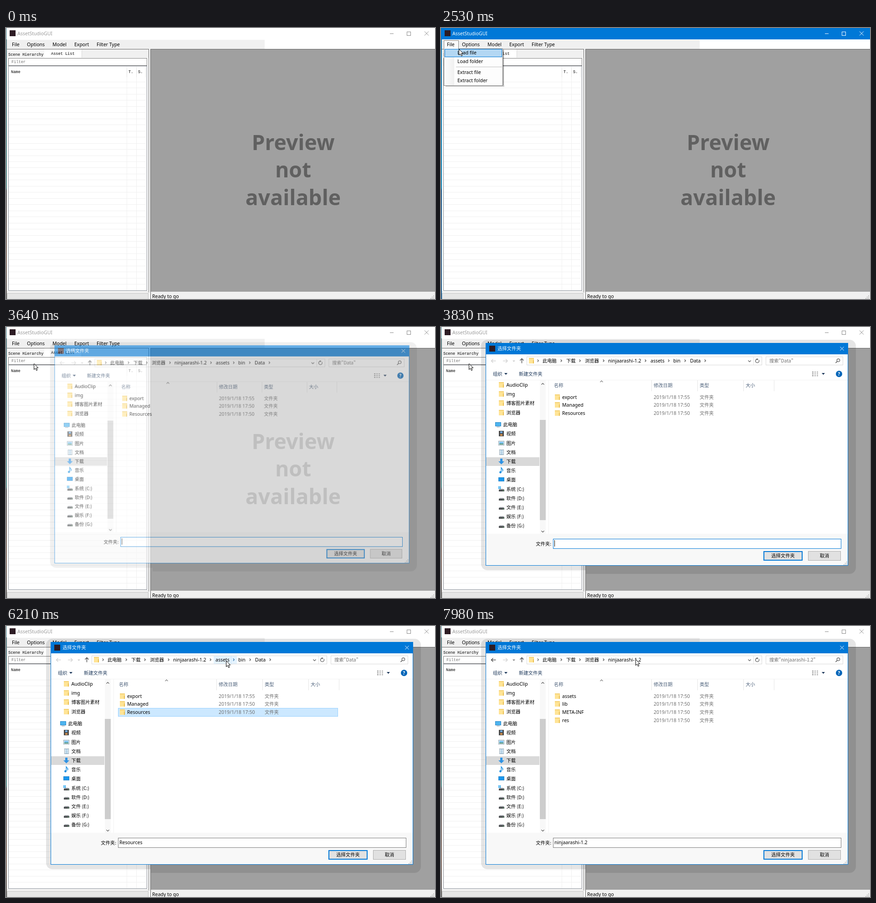
An HTML page with a canvas that plays this animation: 942 px wide and 595 px high, repeating every 8 s.

```html
<!DOCTYPE html>
<html lang="zh">
<head>
<meta charset="utf-8">
<title>AssetStudioGUI</title>
<style>
html, body { margin: 0; width: 942px; height: 595px; overflow: hidden; background: #fff; }
canvas { display: block; }
</style>
</head>
<body>
<canvas id="stage" width="942" height="595"></canvas>
<script>
const g = document.getElementById('stage').getContext('2d');
const LOOP = 8000, STEP = 79;
const UI = '"Noto Sans", "Noto Sans CJK SC", "Noto Sans CJK", sans-serif';
const CJK = '"Noto Sans CJK SC", "Noto Sans CJK", sans-serif';
const MONO = '"Liberation Mono", monospace';
const BLUE = '#0078d7', LOGO = '#2d1c24';

// Pointer moves: [time, x, y]; the pointer rests between groups.
const moves = [
  [[300, 932, 433], [540, 560, 262], [780, 190, 104], [950, 50, 46], [1090, 22, 34]],
  [[2530, 39, 46], [2610, 44, 55], [2780, 61, 80]],
  [[4050, 61, 80], [4250, 160, 108], [4500, 290, 152], [4670, 327, 165], [4840, 330, 171]],
  [[4930, 330, 176], [5010, 330, 184]],
  [[5180, 330, 184], [5340, 332, 184], [5700, 425, 128], [5970, 480, 86]],
  [[6070, 483, 76], [6400, 483, 76], [6870, 485, 73]],
  [[6940, 478, 73], [7430, 427, 73]]
];

const crumbs = [['此电脑', 223, 264], ['下载', 275, 305], ['浏览器', 316, 357],
  ['ninjaarashi-1.2', 367, 449], ['assets', 460, 500], ['bin', 510, 536], ['Data', 547, 580]];

const places = {
  Data: { depth: 7, rows: ['export', 'Managed', 'Resources'] },
  assets: { depth: 5, rows: ['bin'] },
  'ninjaarashi-1.2': { depth: 4, rows: ['assets', 'lib', 'META-INF', 'res'] }
};

const nav = ['AudioClip', 'img', '博客图片素材', '浏览器', '此电脑', '视频', '图片', '文档', '下载',
  '音乐', '桌面', '系统 (C:)', '软件 (D:)', '文件 (E:)', '娱乐 (F:)', '备份 (G:)'];

function box(x, y, w, h, fill, stroke) {
  if (fill) { g.fillStyle = fill; g.fillRect(x, y, w, h); }
  if (stroke) {
    g.strokeStyle = stroke; g.lineWidth = 1;
    g.strokeRect(x + .5, y + .5, w - 1, h - 1);
  }
}

function line(color, width, ...pts) {
  g.strokeStyle = color; g.lineWidth = width;
  g.beginPath();
  for (let i = 0; i < pts.length; i += 2) g.lineTo(pts[i], pts[i + 1]);
  g.stroke();
}

function poly(color, ...pts) {
  g.fillStyle = color;
  g.beginPath();
  for (let i = 0; i < pts.length; i += 2) g.lineTo(pts[i], pts[i + 1]);
  g.fill();
}

function disc(x, y, r, color) {
  g.fillStyle = color;
  g.beginPath(); g.arc(x, y, r, 0, 7); g.fill();
}

function text(s, x, cy, color = '#000', align = 'left') {
  const han = /[\u4e00-\u9fff]/.test(s);
  g.font = han ? '10.3px ' + CJK : '10.5px ' + UI;
  g.fillStyle = color; g.textAlign = align;
  g.fillText(s, x, cy + 4);
}

function mono(s, x, base, color = '#000') {
  g.font = '8.6px ' + MONO;
  g.fillStyle = color; g.textAlign = 'left';
  g.fillText(s, x, base);
}

function cross(x, y, r, color) {
  line(color, 1, x - r, y - r, x + r, y + r);
  line(color, 1, x + r, y - r, x - r, y + r);
}

// dir: 0 right, 1 down, 2 left, 3 up
function chevron(x, y, dir, r, color) {
  g.save();
  g.translate(x, y); g.rotate(dir * Math.PI / 2);
  line(color, 1.1, -r / 2, -r, r / 2, 0, -r / 2, r);
  g.restore();
}

function arrow(x, y, dir, color) {
  g.save();
  g.translate(x, y); g.rotate(dir * Math.PI / 2);
  line(color, 1.3, -5, 0, 5, 0);
  line(color, 1.3, 1, -4, 5, 0, 1, 4);
  g.restore();
}

function grip(x, y) {
  for (let i = 0; i < 3; i++)
    for (let j = 2 - i; j < 3; j++) box(x + j * 3, y + i * 3, 1.5, 1.5, '#a0a0a0');
}

function pointerAt(t) {
  if (t < moves[0][0][0]) return null;
  const path = moves.filter(m => m[0][0] <= t).pop();
  const start = path[0][0], end = path[path.length - 1];
  if (t >= end[0]) return { x: end[1], y: end[2] };
  const q = start + Math.floor((t - start) / STEP) * STEP;
  const i = path.findIndex(k => k[0] > q);
  const [a, b] = [path[i - 1], path[i]];
  const f = (q - a[0]) / (b[0] - a[0]);
  return { x: Math.round(a[1] + (b[1] - a[1]) * f), y: Math.round(a[2] + (b[2] - a[2]) * f) };
}

function drawPointer({ x, y }) {
  g.save();
  g.translate(x + .5, y + .5);
  g.lineJoin = 'miter';
  g.beginPath();
  for (const [px, py] of [[0, 0], [0, 13], [3, 10.2], [5.2, 15], [7.4, 14], [5.2, 9.4], [9.3, 9.2]]) g.lineTo(px, py);
  g.closePath();
  g.fillStyle = '#fff'; g.fill();
  g.strokeStyle = '#000'; g.lineWidth = 1; g.stroke();
  g.restore();
}

function drawBusy({ x, y }) {
  g.beginPath(); g.arc(x, y, 7.5, 0, 7);
  g.strokeStyle = '#2f9be0'; g.lineWidth = 3.5; g.stroke();
}

function drawWindow(t, p) {
  const active = t >= 1330 && t < 3340, menu = t >= 2050 && t < 3260;
  box(0, 0, 942, 595, '#fff');
  // title bar
  if (active) box(0, 0, 942, 25, BLUE);
  const ink = active ? '#fff' : '#999';
  box(8, 5, 13, 13, LOGO);
  text('AssetStudioGUI', 25, 12, ink);
  const btn = active ? '#fff' : '#8a8a8a';
  line(btn, 1, 843, 12.5, 851, 12.5);
  box(880, 8, 9, 9, null, btn);
  cross(923.5, 12, 4.5, btn);

  // menu bar
  box(2, 26, 566, 20, '#f0f0f0');
  if (menu) box(6, 27, 33, 20, '#fafafa', '#808080');
  else if (p && t < 2050 && p.x < 39 && p.y < 45) box(6, 27, 33, 18, '#b3d7f3', BLUE);
  [['File', 13], ['Options', 46], ['Model', 102], ['Export', 150], ['Filter Type', 199]]
    .forEach(([s, x]) => text(s, x, 36));

  // left panel
  box(2, 46, 312, 549, '#fff');
  box(2, 47, 311, 18, '#f0f0f0');
  box(2, 48, 82, 17, '#f5f5f5');
  box(84, 47, 82, 19, '#fff');
  box(166, 47, 1, 18, '#d9d9d9');
  box(1, 46, 313, 1, '#6a6a6a');
  box(313, 46, 1, 535, '#6a6a6a');
  box(314, 47, 3, 548, '#f4f4f4');
  mono('Scene Hierarchy', 5, 61);
  mono('Asset List', 99, 59);
  box(5, 66, 305, 17, '#fff', '#7a7a7a');
  mono('Filter', 12, 77, '#6d6d6d');
  box(5, 83, 305, 494, '#fff', '#828790');
  for (let i = 0; i < 34; i++) box(6, Math.round(118 + i * 13.46), 301, 1, '#f0f0f0');
  [265, 286, 306].forEach(x => {
    box(x, 108, 1, 468, '#f0f0f0');
    box(x, 85, 1, 23, '#e2e2e2');
  });
  mono('Name', 11, 99);
  mono('T.', 269, 99);
  mono('S.', 290, 99);
  box(2, 579, 312, 1, '#d0d0d0');
  box(2, 582, 311, 14, '#e6e6e6', '#bcbcbc');

  // preview
  box(317, 46, 625, 533, '#a0a0a0');
  box(317, 46, 625, 1, '#646464');
  box(317, 46, 1, 549, '#646464');
  g.font = 'bold 46.3px "Open Sans", "Noto Sans", sans-serif';
  g.fillStyle = '#606060'; g.textAlign = 'center';
  ['Preview', 'not', 'available'].forEach((s, i) => g.fillText(s, 630.5, 267.5 + i * 60.7));
  box(318, 579, 624, 16, '#f0f0f0');
  text('Ready to go', 321, 589);
  grip(932, 587);

  // desktop showing at the left edge
  const edge = g.createLinearGradient(0, 0, 0, 595);
  [[0, '#3f7f8c'], [.25, '#2a8a94'], [.59, '#2a9a98'], [.6, '#3a3a40'], [.86, '#8a5a44'], [1, '#444']]
    .forEach(s => edge.addColorStop(...s));
  box(0, active ? 25 : 0, 1, 595, edge);
  box(1, 25, 1, 570, active ? BLUE : '#8c8c8c');

  if (menu) drawMenu(t, p);
}

function drawMenu(t, p) {
  box(10, 126, 129, 3, 'rgba(0,0,0,.2)');
  box(136, 48, 2, 78, 'rgba(0,0,0,.35)');
  box(6, 45, 130, 82, '#fdfdfd', '#808080');
  box(7, 44, 31, 2, '#fafafa');
  const shade = g.createLinearGradient(7, 0, 29, 0);
  shade.addColorStop(0, '#fcfcfc'); shade.addColorStop(1, '#f0f0f0');
  box(7, 46, 22, 80, shade);
  if (t >= 2530) box(8, p.y < 64 ? 46 : 64, 126, 18, '#b3d7f3', BLUE);
  box(33, 85, 101, 1, '#bdbdbd');
  [['Load file', 54], ['Load folder', 73], ['Extract file', 97], ['Extract folder', 115]]
    .forEach(([s, y]) => text(s, 36, y));
}

function folder(x, cy) {
  box(x, cy - 6, 11, 12, '#f4d06f');
  box(x, cy - 4, 10, 10, '#ffe496');
  box(x + 9, cy - 1, 2, 7, '#e9bd4e');
}

function navIcon(i, x, y) {
  if (i < 4) return folder(x + 1, y);
  if (i === 4 || i === 10) {
    box(x, y - 5, 13, 9, i === 4 ? '#4db4ee' : '#1a97ee', '#2b87c8');
    if (i === 4) box(x + 3, y + 5, 7, 1, '#7a8a96');
  } else if (i === 5) {
    box(x + 1, y - 6, 11, 12, '#4a4a4a');
    box(x + 4, y - 5, 5, 4, '#6fa8dc');
    box(x + 4, y + 1, 5, 4, '#c98c4e');
  } else if (i === 6) {
    box(x, y - 5, 13, 10, '#f2f7fa', '#8aa0b0');
    box(x + 2, y - 3, 9, 4, '#7cc1ee');
    box(x + 2, y + 1, 9, 2, '#4d8f72');
  } else if (i === 7) {
    box(x + 2, y - 6, 10, 12, '#fff', '#8aa0b0');
    for (let k = 0; k < 4; k++) box(x + 4, y - 4 + k * 2.5, 6, 1, '#5b9bc8');
  } else if (i === 8) {
    poly('#2f93e4', x + 4, y - 6, x + 9, y - 6, x + 9, y, x + 13, y, x + 6.5, y + 6.5, x, y, x + 4, y);
  } else if (i === 9) {
    disc(x + 4.5, y + 4, 2.4, '#1a8fe0');
    line('#1a8fe0', 1.5, x + 6.3, y + 4, x + 6.3, y - 6, x + 10, y - 1, x + 9, y + 2);
  } else {
    poly('#b8bcc0', x + 3, y - 1, x + 11, y - 1, x + 13, y + 2, x + 1, y + 2);
    box(x + 1, y + 1, 12, 4, '#4c4f52');
    box(x + 10, y + 3, 2, 1, '#7fe08c');
    if (i === 11) for (let k = 0; k < 4; k++) box(x + (k & 1) * 3, y - 6 + (k >> 1) * 3, 2.3, 2.3, '#1a9fee');
  }
}

function drawShadow() {
  g.fillStyle = 'rgba(0,0,0,.1)';
  g.beginPath();
  g.roundRect(88, 28, 814, 506, 14);
  g.roundRect(318, 28, 593, 514, [0, 14, 14, 0]);
  g.fill();
}

function drawAddress(t, p, name) {
  const depth = places[name].depth, last = name === 'ninjaarashi-1.2';
  arrow(115.5, 74.5, 2, name === 'Data' ? '#cfcfcf' : '#444');
  arrow(141, 74.5, 0, '#cfcfcf');
  chevron(160, 74.5, 1, 2, name === 'Data' ? '#bbb' : '#555');
  arrow(177.5, 74.5, 3, '#444');
  box(188, 65, 517, 19, '#fff', '#d9d9d9');
  box(686, 66, 1, 17, '#e2e2e2');
  folder(193, 74);
  chevron(213, 74, 0, 2.5, '#555');
  const pressed = t >= 6370 && t < 6450 || t >= 7590 && t < 7730;
  for (let i = 0; i < depth; i++) {
    const [s, x, cx] = crumbs[i];
    const left = x - 3.5 | 0, right = cx + 7;
    const over = p.y >= 66 && p.y < 83 && p.x >= left && p.x < right && t >= 6070 && t < 7730;
    if (over) {
      box(left, 66, right - left, 17, pressed ? '#cce8ff' : '#e5f3ff');
      box(cx - 6, 66, 1, 17, '#cce8ff');
    }
    text(s, x, 74);
    if (!(last && i === depth - 1)) chevron(cx, 74, 0, 2.5, over ? '#2a6fa8' : '#444');
  }
  chevron(677.5, 75, 1, 3, '#555');
  g.beginPath(); g.arc(694.5, 74.5, 4, -.6, 4.6);
  g.strokeStyle = '#555'; g.lineWidth = 1.2; g.stroke();
  poly('#555', 693, 69, 697, 70.5, 693.5, 73);
  box(713, 65, 170, 19, '#fff', '#d9d9d9');
  text('搜索"' + name + '"', 721, 74, '#6d6d6d');
  g.beginPath(); g.arc(872.5, 73, 3.2, 0, 7);
  g.strokeStyle = '#555'; g.lineWidth = 1.2; g.stroke();
  line('#555', 1.6, 870, 75.5, 866.5, 79);
}

function drawDialog(t, p) {
  const name = t < 6450 ? 'Data' : t < 7730 ? 'assets' : 'ninjaarashi-1.2';
  const picked = t >= 5180;
  drawShadow();
  box(98, 35, 796, 489, '#fff');
  box(98, 35, 796, 25, BLUE);
  box(106, 41, 13, 13, LOGO);
  text('选择文件夹', 124, 47, '#fff');
  cross(880.5, 47.5, 4, '#fff');
  drawAddress(t, p, name);

  // tool bar
  text('组织', 114, 103, '#1e395b');
  poly('#1e395b', 139, 101, 146, 101, 142.5, 105);
  text('新建文件夹', 171, 103, '#1e395b');
  for (let i = 0; i < 3; i++) {
    box(815, 98 + i * 4, 3, 2, '#8a8a8a');
    box(820, 98 + i * 4, 3, 2, '#a5a5a5');
    box(825, 98 + i * 4, 3, 2, '#a5a5a5');
  }
  poly('#1e395b', 836, 101, 843, 101, 839.5, 105);
  disc(874, 103, 7, '#0065b8');
  g.font = 'bold 10px ' + UI; g.fillStyle = '#fff'; g.textAlign = 'center';
  g.fillText('?', 874, 106.6);
  box(99, 116, 794, 1, '#f2f2f2');

  // navigation pane
  box(99, 286, 117, 19, '#d9d9d9');
  nav.forEach((s, i) => {
    const y = Math.round(127 + i * 20.2 + (i > 3 ? 6.4 : 0)), x = i === 4 ? 119 : 126;
    navIcon(i, x, y);
    text(s, x + 17.5, y);
  });
  box(217, 117, 13, 337, '#f8f8f8');
  box(217, 204, 13, 220, '#cdcdcd');
  chevron(223.5, 125, 3, 3, '#555');
  chevron(223.5, 449, 1, 3, '#555');
  box(236, 117, 1, 337, '#f0f0f0');

  // file list
  [462, 563, 664, 731].forEach(x => box(x, 117, 1, 24, '#e5e5e5'));
  [['名称', 248], ['修改日期', 467], ['类型', 568], ['大小', 669]]
    .forEach(([s, x]) => text(s, x, 128, '#4c607a'));
  chevron(352.5, 119.5, 3, 3, '#777');
  places[name].rows.forEach((s, i) => {
    const y = Math.round(153.6 + i * 17.7), top = y - 9;
    const over = p.x >= 246 && p.x < 728 && p.y >= top && p.y < top + 18;
    if (name === 'Data' && i === 2 && picked) box(246, top, 483, 19, '#cce8ff', '#99d1ff');
    else if (over) box(246, top, 483, 18, '#e5f3ff');
    folder(250, y);
    text(s, 266, y);
    text('2019/1/18 17:' + (s === 'export' ? '55' : '50'), 467, y, '#6d6d6d');
    text('文件夹', 568, y, '#6d6d6d');
  });

  // name field and buttons
  box(99, 454, 794, 69, '#f8f8f8');
  text('文件夹:', 242, 476, '#000', 'right');
  box(246, 465, 633, 22, '#fff', picked ? '#7a7a7a' : BLUE);
  if (picked) text(name === 'Data' ? 'Resources' : name, 249, 475);
  else if (t < 4130 || t >= 4650) box(249, 468, 1, 14, '#000');
  box(708, 492, 86, 21, '#e1e1e1', BLUE);
  box(709, 493, 84, 19, null, BLUE);
  text('选择文件夹', 751, 502, '#000', 'center');
  box(806, 492, 72, 21, '#e1e1e1', '#adadad');
  text('取消', 842, 502, '#000', 'center');
  grip(884, 515);
  box(98, 35, 796, 489, null, BLUE);
}

function drawFading(t, p) {
  const [alpha, scale] = t < 3720 ? [.6, .979] : t < 3810 ? [.88, .993] : [1, 1];
  if (alpha === 1) return drawDialog(t, p);
  // fade the dialog as one layer
  layer.save();
  layer.clearRect(0, 0, 942, 595);
  layer.restore();
  paintOn(layer, () => drawDialog(t, p));
  g.save();
  g.globalAlpha = alpha;
  g.translate(496, 279.5); g.scale(scale, scale); g.translate(-496, -279.5);
  g.drawImage(layer.canvas, 0, 0);
  g.restore();
}
</script>
<script>
const sheet = document.createElement('canvas');
sheet.width = 942; sheet.height = 595;
const layer = sheet.getContext('2d');

// Runs the drawing calls and keeps the result on another surface.
function paintOn(target, draw) {
  const back = document.createElement('canvas');
  back.width = 942; back.height = 595;
  back.getContext('2d').drawImage(g.canvas, 0, 0);
  g.clearRect(0, 0, 942, 595);
  draw();
  target.drawImage(g.canvas, 0, 0);
  g.clearRect(0, 0, 942, 595);
  g.drawImage(back, 0, 0);
}

const began = performance.now();
function frame() {
  const t = (performance.now() - began) % LOOP;
  const p = pointerAt(t);
  drawWindow(t, p);
  if (t >= 3640) drawFading(t, p);
  if (p) (t >= 3340 && t < 3480 ? drawBusy : drawPointer)(p);
  requestAnimationFrame(frame);
}
frame();
</script>
</body>
</html>
```
